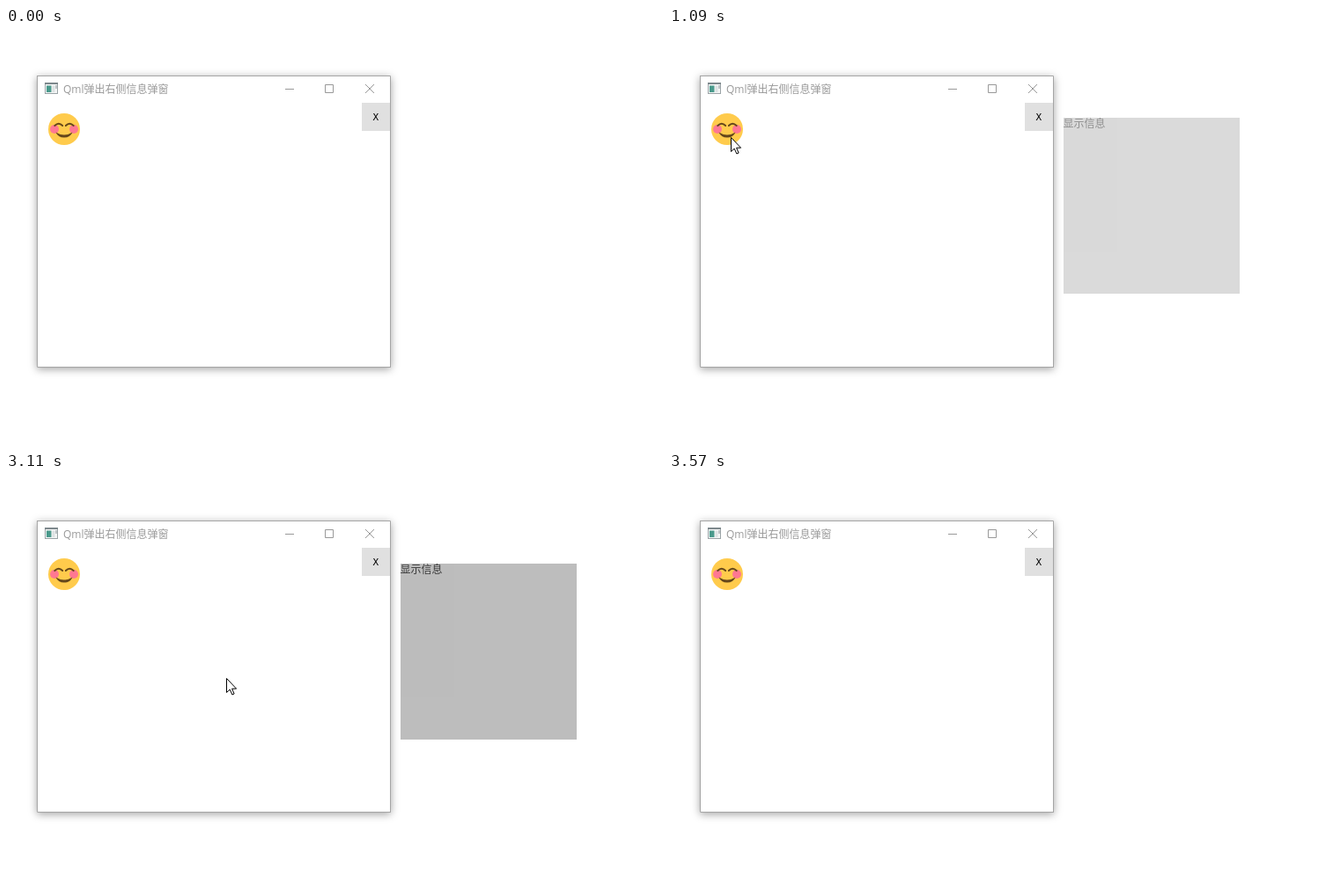
An HTML page that plays this animation: 746x474 px, repeating every 4.12 s.

```html
<!DOCTYPE html>
<html lang="zh">
<head>
<meta charset="utf-8">
<style>
html, body { margin: 0; width: 100%; height: 100%; overflow: hidden; background: #fff; }
#shadow {
  position: absolute; left: 35px; top: 54px; width: 402px; height: 332px;
  box-shadow: 0 2px 9px rgba(0, 0, 0, .36);
}
#shadow.active { box-shadow: 0 4px 16px rgba(0, 0, 0, .38); }
svg { position: absolute; left: 0; top: 0; display: block; }
text { font: 12px "Open Sans", "Noto Sans CJK SC", "Noto Sans CJK", sans-serif; }
#close { font: 11px "DejaVu Sans Mono", monospace; }
.line { fill: none; }
#frame { color: #999; }
#frame .edge { stroke: #a5a5a5; }
#frame.active { color: #000; }
#frame.active .edge { stroke: #b4bcc1; }
#frame.active .lit { stroke: #a3c8de; }
</style>
</head>
<body>
<div id="shadow"></div>
<svg width="746" height="474" viewBox="0 0 746 474">
  <g id="frame">
    <rect x="35" y="54" width="402" height="332" fill="#fff"/>
    <path class="line edge" d="M35.5 54V385.5H437"/>
    <path class="line edge lit" d="M35 54.5H436.5V385"/>
    <text x="65" y="74" fill="currentColor">Qml弹出右侧信息弹窗</text>
    <g class="line" stroke="currentColor">
      <path d="M317 69.5H327M362.5 64.5H371.5V73.5H362.5Z"/>
      <path d="M408 64L418 74M418 64L408 74"/>
    </g>
  </g>

  <g id="app-icon">
    <rect x="44.5" y="62.5" width="14" height="12" fill="#f4f6f6" stroke="#9aa3a6"/>
    <path d="M44 63H59" stroke="#7d888c" stroke-width="2"/>
    <rect x="46" y="65.5" width="5.5" height="7.5" fill="#4a9a8c"/>
    <rect x="52.5" y="65.5" width="3" height="7.5" fill="#dde2e3"/>
    <path d="M57 65V69" stroke="#8a9599"/>
  </g>

  <rect x="404" y="85" width="32" height="32" fill="#e0e0e0"/>
  <text id="close" x="419.7" y="105" text-anchor="middle">X</text>

  <g id="smiley">
    <circle cx="66" cy="115" r="18" fill="#ffcb4c"/>
    <circle cx="55" cy="115" r="5" fill="#ff7892"/>
    <circle cx="77" cy="115" r="5" fill="#ff7892"/>
    <g class="line" stroke="#65471b" stroke-width="1.9" stroke-linecap="round">
      <path d="M55.3 111Q59.8 106.5 64.2 111M67.8 111Q72.2 106.5 76.7 111"/>
    </g>
    <path d="M56.5 118.5Q66 124.5 75.5 118.5Q73 124.5 66 124.5T56.5 118.5Z" fill="#65471b"/>
  </g>

  <g id="panel">
    <rect x="448" width="200" height="200" fill="#aaa"/>
    <text x="447.5" y="11">显示信息</text>
  </g>

  <path id="cursor" d="M.5 .5V16.5L4.2 13.1 6.9 19 9.1 18 6.6 12.2H11.6Z" fill="#fff" stroke="#000"/>
</svg>
<script>
const LOOP = 4120;
const byId = id => document.getElementById(id);
const clamp = v => Math.min(1, Math.max(0, v));
const progress = (t, start, duration) => clamp((t - start) / duration);

const ticks = [0];
for (const [first, last, count] of [
  [70, 530, 7], [620, 1090, 7], [1160, 1410, 4], [1870, 2330, 7], [3110, 3570, 7]
]) {
  for (let i = 0; i < count; i++) {
    ticks.push(Math.floor((first + (last - first) * i / (count - 1)) / 10) * 10);
  }
}

const easeIn = u => u * u;
const easeOut = u => 1 - (1 - u) ** 2;
const easeInOut = u => u * u * (3 - 2 * u);

// Cursor moves: start, end, from, to, easing
const moves = [
  [70, 620, [536, 397], [147, 186], easeOut],
  [620, 1010, [147, 186], [70, 124], easeOut],
  [1800, 2330, [70, 124], [250, 233], easeInOut],
  [3260, 3490, [250, 233], [440, 351], easeIn]
];

function drawCursor(t) {
  const visible = t >= 70 && t < 3570;
  byId("cursor").style.display = visible ? "" : "none";
  if (!visible) return;
  const [start, end, from, to, ease] = moves.findLast(m => m[0] <= t);
  const k = ease(progress(t, start, end - start));
  const [x, y] = from.map((v, i) => Math.round(v + (to[i] - v) * k));
  byId("cursor").setAttribute("transform", `translate(${x} ${y})`);
}

function drawPanel(t) {
  const hide = progress(t, 3048, 277);
  const opacity = progress(t, 872, 500) - hide;
  const y = Math.floor(84 + 25 * (progress(t, 872, 300) - hide));
  byId("panel").setAttribute("opacity", opacity);
  byId("panel").setAttribute("transform", `translate(0 ${y})`);
}

function draw(now) {
  const t = ticks.findLast(tick => tick <= now % LOOP);
  const active = t >= 450 && t < 930;
  byId("frame").classList.toggle("active", active);
  byId("shadow").classList.toggle("active", active);
  drawPanel(t);
  drawCursor(t);
}

const begin = performance.now();
function loop() {
  draw(performance.now() - begin);
  requestAnimationFrame(loop);
}
loop();
</script>
</body>
</html>
```
